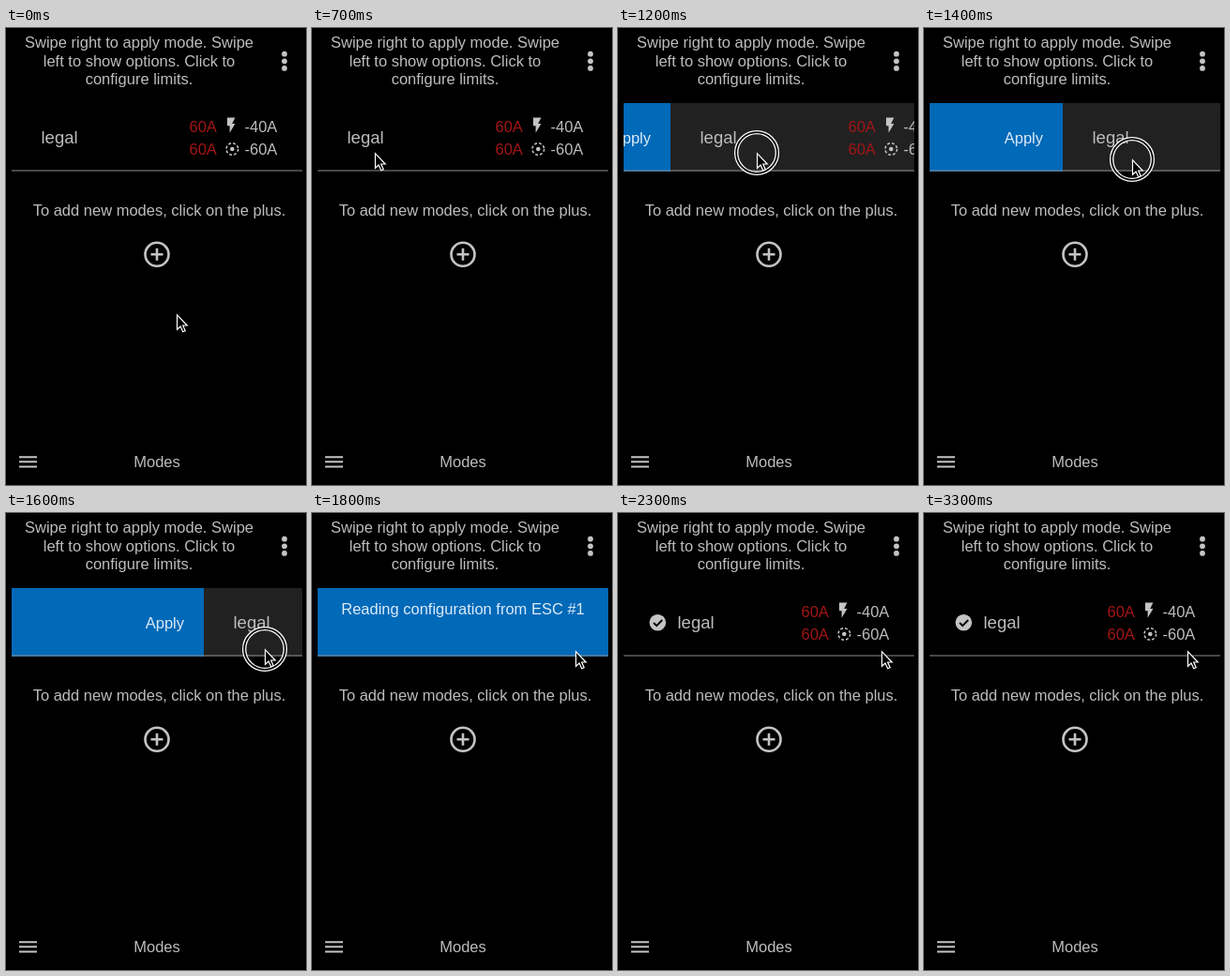
Recreate the animation shown at these times as an HTML page. Size 320 by 487 pixels, loop 3.7 s.

```html
<!DOCTYPE html>
<html lang="en">
<head>
<meta charset="utf-8">
<title>Modes</title>
<style>
  html, body { margin: 0; width: 100%; height: 100%; overflow: hidden; background: #000; }
  svg { display: block; width: 100vw; height: 100vh; }
  text { font: 16.5px "Liberation Sans", Arial, sans-serif; fill: #bdbdbd; }
  .mid { text-anchor: middle; }
  .name { font-size: 18.5px; }
  .red { fill: #a31515; }
  .onBlue { fill: #dcebf7; }
  .icon { fill: #c4c4c4; }
  .line { fill: none; stroke: #c4c4c4; }
</style>
</head>
<body>
<svg viewBox="0 0 320 487">
  <defs><clipPath id="rowClip"><rect x="6" y="80" width="310" height="73"/></clipPath></defs>
  <rect width="320" height="487"/>

  <g class="mid">
    <text x="142" y="21">Swipe right to apply mode. Swipe</text>
    <text x="142" y="40.5">left to show options. Click to</text>
    <text x="142" y="60">configure limits.</text>
    <text x="163.5" y="200">To add new modes, click on the plus.</text>
    <text x="161" y="468">Modes</text>
  </g>
  <g class="icon">
    <circle cx="297" cy="27.7" r="2.9"/>
    <circle cx="297" cy="35.3" r="2.9"/>
    <circle cx="297" cy="42.9" r="2.9"/>
  </g>
  <g class="line">
    <circle cx="161" cy="241.3" r="12.5" stroke-width="2.6"/>
    <path d="M154.5 241.3h13M161 234.8v13" stroke-width="2.6"/>
    <path d="M14 457.2h19M14 462.3h19M14 467.4h19" stroke-width="2"/>
  </g>

  <g clip-path="url(#rowClip)">
    <rect id="blue" x="6" y="80" width="310" height="73" fill="#0069b8"/>
    <text id="apply" class="onBlue" y="123" text-anchor="end">Apply</text>
    <text id="reading" class="onBlue mid" x="161" y="108">Reading configuration from ESC #1</text>
    <g id="row">
      <rect id="rowBack" x="6" y="80" width="310" height="73"/>
      <g id="check">
        <circle class="icon" cx="42.3" cy="116.8" r="8.8"/>
        <path d="M38 117l3.2 3.2l6-6.2" fill="none" stroke="#000" stroke-width="1.9"/>
      </g>
      <text id="label" class="name" y="123">legal</text>
      <text class="red" x="195.5" y="111">60A</text>
      <text class="red" x="195.5" y="135">60A</text>
      <text x="254.5" y="111">-40A</text>
      <text x="254.5" y="135">-60A</text>
      <path class="icon" d="M236 95.5h8.4l-3.2 6.4h3.2l-5.8 9.8v-7.4h-2.6z"/>
      <circle class="line" cx="241.3" cy="129" r="6.3" stroke-width="1.5" stroke-dasharray="2.9 2.05"/>
      <circle class="icon" cx="241.3" cy="129" r="2.3"/>
    </g>
    <path d="M6 152h310" stroke="#8c8c8c" stroke-width="1.2"/>
  </g>

  <g id="pointer">
    <g id="ring" fill="none">
      <circle r="22" stroke="#000" stroke-width="3"/>
      <circle r="23.4" stroke="#fff" stroke-width="1.3"/>
      <circle r="20.3" stroke="#fff" stroke-width="1.3"/>
    </g>
    <path d="M.5 .7V16.3L4.1 13L6.7 18.8L9.2 17.7L6.7 12H11.2Z" fill="#000" stroke="#fff" stroke-width="1.2"/>
  </g>
</svg>
<script>
const LOOP = 3700;
// time, pointer x, pointer y, row shift, state
const steps = [
  [0, 182, 305, 0, "idle"],
  [300, 174, 293, 0, "idle"],
  [400, 148, 254, 0, "idle"],
  [500, 112, 201, 0, "idle"],
  [600, 81, 154, 0, "idle"],
  [700, 67, 133, 0, "idle"],
  [800, 68, 132, 0, "drag"],
  [1200, 148, 133, 50, "drag"],
  [1300, 185, 136, 98, "drag"],
  [1400, 222, 140, 142, "drag"],
  [1500, 254, 143, 179, "drag"],
  [1600, 276, 145, 205, "drag"],
  [1700, 281, 147, 310, "release"],
  [1800, 281, 147, 310, "reading"],
  [2300, 281, 147, 0, "done"]
];
const el = id => document.getElementById(id);
const show = (id, on) => { el(id).style.display = on ? "" : "none"; };
const move = (id, x, y) => el(id).setAttribute("transform", `translate(${x} ${y})`);

function draw(time) {
  const [, x, y, shift, state] = steps.findLast(step => step[0] <= time);
  const done = state === "done";
  move("pointer", x, y);
  move("row", shift, 0);
  el("apply").setAttribute("x", shift - 15 + (shift === 310 ? -6 : 0));
  el("label").setAttribute("x", done ? 63.5 : 37.5);
  el("rowBack").setAttribute("fill", state === "drag" ? "#212121" : "#000");
  show("ring", state === "drag");
  show("blue", shift > 0);
  show("apply", shift > 0 && state !== "reading");
  show("reading", state === "reading");
  show("check", done);
}

const start = performance.now();
function tick() {
  draw((performance.now() - start) % LOOP);
  requestAnimationFrame(tick);
}
tick();
</script>
</body>
</html>
```
